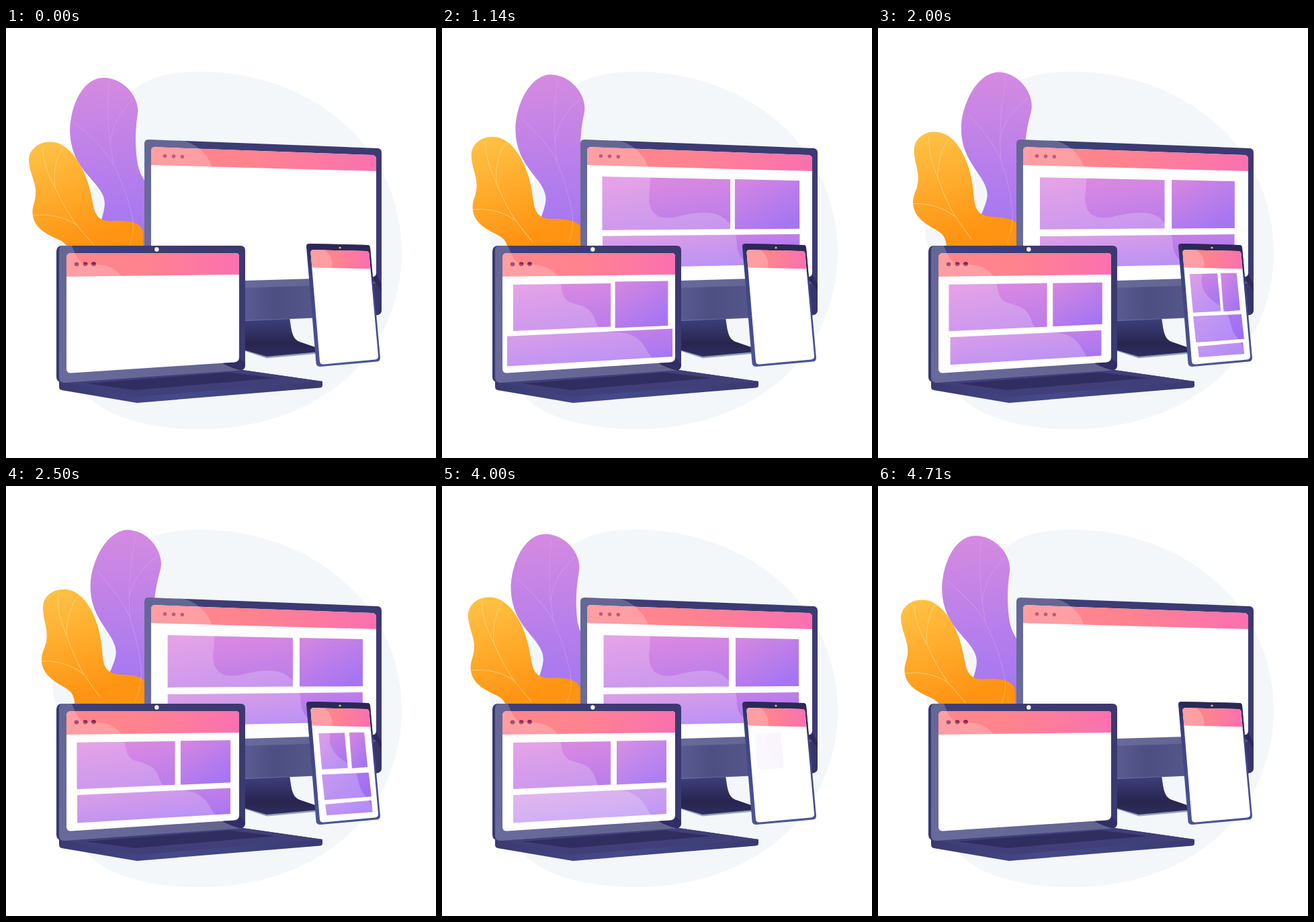
An HTML page that plays this animation: 640x640 px, repeating every 4780 ms.

```html
<!DOCTYPE html>
<html lang="en">
<head>
<meta charset="utf-8">
<title>Responsive screens</title>
<style>
html, body { margin: 0; width: 100%; height: 100%; overflow: hidden; background: #fff; }
svg { display: block; width: 100vw; height: 100vh; }
.vein { fill: none; stroke-width: 1; stroke-linecap: round; }
.gloss { fill: #fff; opacity: .2; }
</style>
</head>
<body>
<svg viewBox="0 0 640 640" xmlns="http://www.w3.org/2000/svg">
  <defs>
    <linearGradient id="purple" gradientUnits="userSpaceOnUse" x1="140" y1="74" x2="165" y2="295">
      <stop offset="0" stop-color="#d58ae0"/><stop offset="1" stop-color="#a678f1"/>
    </linearGradient>
    <linearGradient id="orange" gradientUnits="userSpaceOnUse" x1="60" y1="172" x2="115" y2="318">
      <stop offset="0" stop-color="#ffc144"/><stop offset="1" stop-color="#ff9413"/>
    </linearGradient>
    <linearGradient id="header">
      <stop offset="0" stop-color="#ff868a"/><stop offset=".45" stop-color="#ff838f"/><stop offset="1" stop-color="#fb70b0"/>
    </linearGradient>
    <linearGradient id="wide" x1="0" y1="0" x2=".45" y2="1.2">
      <stop offset="0" stop-color="#e18be0"/><stop offset="1" stop-color="#b67ceb"/>
    </linearGradient>
    <linearGradient id="panel" x1="0" y1="0" x2=".7" y2="1">
      <stop offset="0" stop-color="#d687e0"/><stop offset="1" stop-color="#a575f3"/>
    </linearGradient>
    <linearGradient id="low" x1="0" y1="0" x2="1" y2=".6">
      <stop offset="0" stop-color="#bb80eb"/><stop offset="1" stop-color="#9d6ff5"/>
    </linearGradient>
    <linearGradient id="monitorBody" gradientUnits="userSpaceOnUse" x1="206" y1="400" x2="400" y2="200">
      <stop offset="0" stop-color="#454a89"/><stop offset="1" stop-color="#3b3a72"/>
    </linearGradient>
    <linearGradient id="laptopBody" gradientUnits="userSpaceOnUse" x1="80" y1="500" x2="290" y2="340">
      <stop offset="0" stop-color="#424582"/><stop offset="1" stop-color="#3a3970"/>
    </linearGradient>
    <linearGradient id="chin" gradientUnits="userSpaceOnUse" x1="356" y1="0" x2="559" y2="0">
      <stop offset="0" stop-color="#595b91"/><stop offset=".22" stop-color="#4d4e82"/>
      <stop offset=".5" stop-color="#54568a"/><stop offset="1" stop-color="#353368"/>
    </linearGradient>
    <linearGradient id="stand" x1="0" y1="0" x2="0" y2="1">
      <stop offset="0" stop-color="#404584"/><stop offset=".7" stop-color="#28254f"/><stop offset="1" stop-color="#2f2d5e"/>
    </linearGradient>
    <linearGradient id="phoneBody" x1=".3" y1="0" x2=".2" y2="1">
      <stop offset="0" stop-color="#2b2856"/><stop offset=".25" stop-color="#3c4280"/><stop offset="1" stop-color="#4d5596"/>
    </linearGradient>
    <linearGradient id="base">
      <stop offset="0" stop-color="#3a3970"/><stop offset=".45" stop-color="#454a8a"/><stop offset="1" stop-color="#3a3970"/>
    </linearGradient>
    <clipPath id="monitorClip"><path id="monitorShape" d="M206 172Q206 166 212 166L553 179Q559 179.500 559 185.500V419Q559 427 551 427.500L206 443Z"/></clipPath>
    <clipPath id="laptopClip"><path id="laptopShape" d="M79 331Q79 324 86 324H349Q356 324 356 331V502Q356 509 349 509.500L87 528Q79 528 79 520Z"/></clipPath>
    <clipPath id="monitorScreen"><path d="M216 183Q216 177 222 177.300L545 189Q551 189.500 551 195V364Q551 370 545 370.500L216 380Z"/></clipPath>
    <clipPath id="laptopScreen"><path d="M90 342Q90 335 97 335H342Q347 335 347 340V490Q347 497 340 497.500L97 513.500Q90 514 90 507Z"/></clipPath>
    <clipPath id="phoneScreen"><path d="M453.500 334Q453.500 330 458 330.200L536 332Q540 332 540.500 336L554 488Q554.500 493 549 493.500L473 500.500Q467.500 501 467 496Z"/></clipPath>
  </defs>

  <path fill="#f3f7fa" d="M290 65C390 65 482 108 535 176C572 224 589 278 589 335C589 400 563 470 510 519C450 573 370 597 290 597C220 597 160 583 126 552C112 536 118 420 85 350C72 325 66 305 73 284C84 258 130 250 143 215C160 170 160 118 192 90C218 70 250 65 290 65Z"/>

  <g id="purpleLeaf">
    <path fill="url(#purple)" d="M145 74C175 74 199 103 196 127C192 152 192 180 196 203C199 216 203 222 208 230C222 255 228 300 225 345H142L138 300C141 288 143 283 145 274C149 258 147 249 133 232C117 213 96 195 95 152C97 108 118 74 145 74Z"/>
    <g class="vein" stroke="#d9a3f2" opacity=".5">
      <path d="M153 81C151 115 150 150 160 203C174 232 184 260 189 287Q188 305 186 322"/>
      <path d="M189 107C168 126 157 148 155 174M103 141C122 158 146 178 160 203"/>
    </g>
  </g>
  <g id="orangeLeaf">
    <path fill="url(#orange)" d="M66 169.500C88 169 107 193 117 217C126 238 128 258 131 269C135 283 143 288 158 287.500C178 286 203 288 204 305V370H100L96 340C93 323 88 319 74 313C59 306 41 297 39.500 276C39 262 45 258 44 242C43 226 35 216 34 198C33 183 47 169 66 169.500Z"/>
    <g class="vein" stroke="#ffd67c" opacity=".8">
      <path d="M54 178C56 204 64 220 73 237C82 257 94 279 105 293Q117 308 131 323"/>
      <path d="M84 178C72 198 71 218 73 237M40 279C64 276 87 281 105 293"/>
      <path d="M189 288Q191 306 184 324" opacity=".5"/>
    </g>
  </g>

  <path fill="#94a0ba" d="M350 479L388 491.500L466 484.500V478H350Z"/>
  <path fill="url(#stand)" d="M350 425H421C425 446 424 462 437 467L466 477V482L388 489L350 478Z"/>
  <use href="#monitorShape" fill="url(#monitorBody)"/>
  <g clip-path="url(#monitorScreen)">
    <path fill="#fff" d="M200 160H570V400H200Z"/>
    <path fill="url(#header)" d="M216 170H551V213L216 204Z"/>
    <g fill="#a93468"><ellipse cx="236.500" cy="190.500" rx="2.800" ry="2.700"/><ellipse cx="249.500" cy="191" rx="2.800" ry="2.700"/><ellipse cx="262.300" cy="191.500" rx="2.800" ry="2.700"/></g>
    <g id="monitorPanels"></g>
  </g>
  <path clip-path="url(#monitorClip)" class="gloss" d="M200 160L262 167C290 174 305 195 309 215C312 235 306 250 309 262C313 282 330 285 350 281C385 272 410 272 424 287C436 297 439 310 439 325C441 340 450 350 470 356C505 360 545 366 559 390V450H200Z"/>
  <path fill="url(#chin)" d="M350 387L559 380V419Q559 427 551 427.500L350 435Z"/>
  <path fill="#2d2a5a" d="M545 371Q551 371 551 366L559 382V391Q552 380 545 374Z"/>

  <path fill="#373873" d="M75 333Q75 324 84 324H95V528H84Q75 527 75 519Z"/>
  <path fill="url(#base)" d="M79 526L352 509L471 526V532Q471 535 467 535.500L195 558L83 539Q79 538 79 534Z"/>
  <path fill="#403f79" d="M80 526L352 509L471 526L195 549Z"/>
  <path fill="#302e61" d="M119 529L332 512.500L402 521L192 539Z"/>
  <use href="#laptopShape" fill="url(#laptopBody)"/>
  <g clip-path="url(#laptopScreen)">
    <path fill="#fff" d="M80 330H360V520H80Z"/>
    <path fill="url(#header)" d="M90 330H347V367L90 370Z"/>
    <g fill="#8c2452"><ellipse cx="105" cy="351.500" rx="3.400" ry="3.100"/><ellipse cx="118" cy="351.300" rx="3.400" ry="3.100"/><ellipse cx="130.500" cy="351.200" rx="3.400" ry="3.100"/></g>
    <g id="laptopPanels"></g>
  </g>
  <path clip-path="url(#laptopClip)" class="gloss" d="M75 324H98C104 338 108 351 122 352C145 351 160 355 172 369C180 382 175 400 190 408C206 413 222 415 228 434C232 449 240 453 262 453C290 454 300 470 307 483C315 497 330 503 356 509V535H75Z"/>
  <path fill="#302e62" d="M322 499L340 498Q347 497 348 491L356 500Q356 509 349 509.500Q335 506 322 499Z"/>
  <circle cx="224.300" cy="329.500" r="3.200" fill="#fff"/>

  <path fill="url(#phoneBody)" d="M447 325Q447 321 451 321L538 323Q541.500 323 542 327L557 491Q557 496 552 496.500L468 504Q462 504 461.500 499Z"/>
  <path fill="#2b2856" d="M452 321L538 323Q541.500 323 542 327L546 374L538 333L452 330Z"/>
  <g clip-path="url(#phoneScreen)">
    <path fill="#fff" d="M440 320H560V510H440Z"/>
    <path fill="url(#header)" d="M450 325H543V358.500L450 356.500Z"/>
    <g id="phonePanels"></g>
  </g>
  <path clip-path="url(#phoneScreen)" class="gloss" d="M447 321L464 326C480 330 488 345 485 358C480 375 480 385 490 398C500 410 512 412 518 422C526 435 524 450 534 460C542 470 548 480 550 505H440Z"/>
  <circle cx="497" cy="327" r="1.600" fill="#f6c445"/>
</svg>
<script>
const LOOP = 4780, GROW = 290, FADE = 400, STEP = 73;
const byId = id => document.getElementById(id);
const panels = [];

// Each panel is four corners; panels enter and leave one after another in the listed order.
function addPanels(id, inAt, outAt, list) {
  list.forEach(([fill, ...corners], i) => {
    const el = document.createElementNS("http://www.w3.org/2000/svg", "polygon");
    const mid = axis => {
      const side = corners.filter((_, k) => k % 2 === axis);
      return (Math.min(...side) + Math.max(...side)) / 2;
    };
    el.setAttribute("fill", `url(#${fill})`);
    byId(id).append(el);
    panels.push({ el, corners, center: [mid(0), mid(1)], inAt: inAt + i * STEP, outAt: outAt + i * STEP });
  });
}

addPanels("monitorPanels", 0, 4160, [
  ["panel", 240.5, 310, 531, 307, 531, 351, 240.5, 357],
  ["wide", 240.5, 222, 427, 226, 427, 298.5, 240.5, 300],
  ["panel", 437, 226, 531, 228, 531, 298, 437, 298.5]
]);
addPanels("laptopPanels", 704, 3900, [
  ["panel", 106, 460, 334, 449.5, 334, 488, 106, 501.5],
  ["panel", 260, 379.5, 334, 378.5, 334, 441, 260, 444.5],
  ["wide", 106, 382, 251, 380, 251, 444.5, 106, 451]
]);
addPanels("phonePanels", 1422, 3413, [
  ["low", 476, 474, 543, 468, 545, 485, 478, 490],
  ["low", 471, 430, 539, 427, 543, 462, 475, 467],
  ["panel", 511, 367, 533, 367, 538, 418, 515, 420],
  ["panel", 465, 368, 504, 367, 509, 420, 470, 422]
]);

// Linear growth followed by a damped wobble.
function pop(t) {
  if (t <= 0) return 0;
  if (t < GROW) return t / GROW;
  const u = (t - GROW) / 1000;
  return 1 + 0.106 * Math.exp(-1.93 * u) * Math.sin(2 * Math.PI * u / 0.6);
}

function draw(t) {
  const sway = (1 - Math.cos(2 * Math.PI * t / LOOP)) / 2;
  byId("purpleLeaf").setAttribute("transform", `rotate(${7.6 * sway} 229 382)`);
  byId("orangeLeaf").setAttribute("transform", `rotate(${5.7 * sway} 234 402)`);
  for (const { el, corners, center, inAt, outAt } of panels) {
    const size = pop(t - inAt);
    const alpha = Math.min(1, Math.max(0, 1 - (t - outAt) / FADE));
    el.setAttribute("points", corners.map((v, k) => center[k % 2] + (v - center[k % 2]) * size).join(" "));
    el.setAttribute("fill-opacity", alpha);
  }
}

const start = performance.now();
function tick() {
  draw((performance.now() - start) % LOOP);
  requestAnimationFrame(tick);
}
tick();
</script>
</body>
</html>
```
